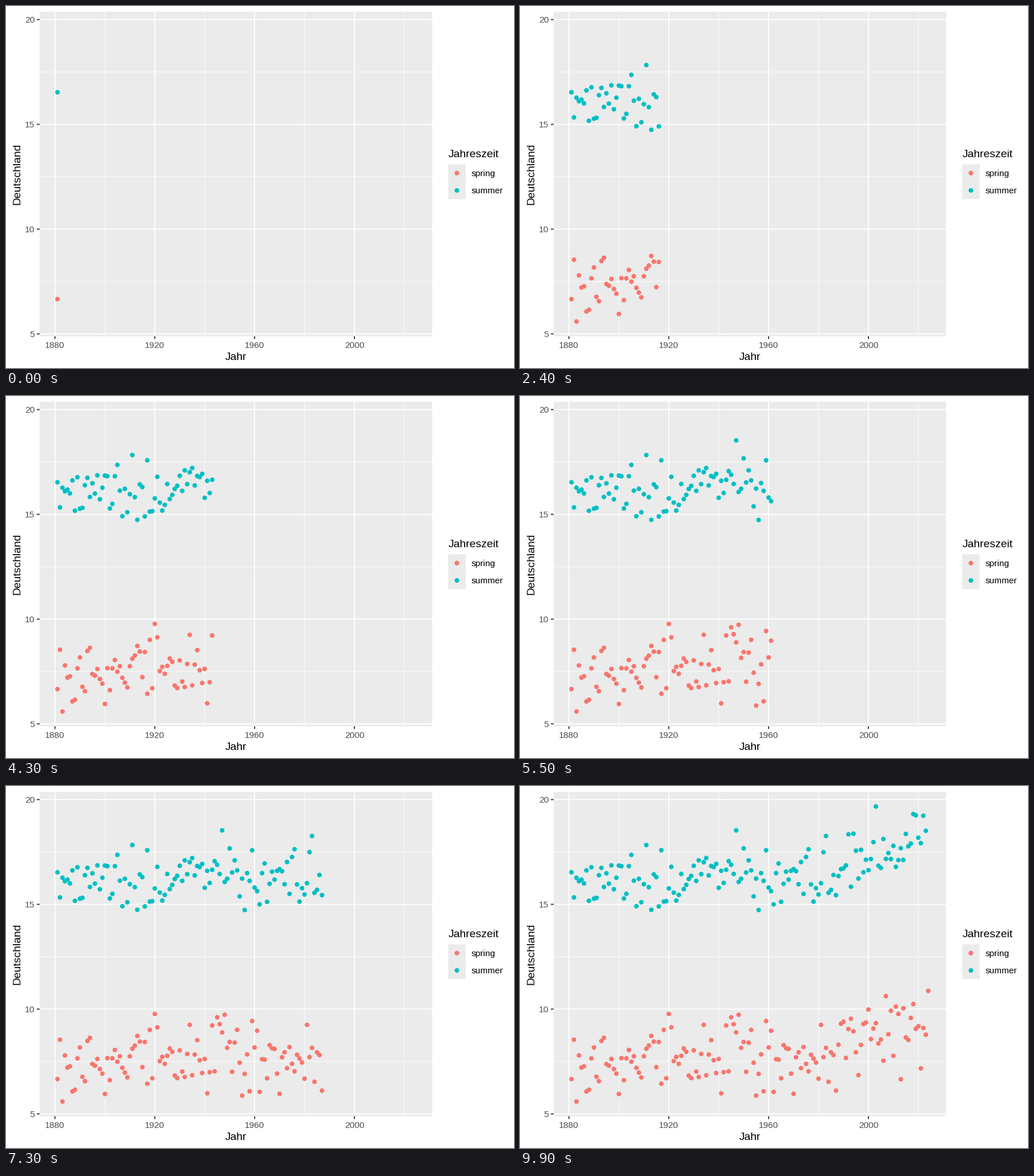
A matplotlib script that plays this animation: 885x632 px, repeating every 10000 ms.

```python
import matplotlib.pyplot as plt
import numpy as np
from matplotlib.animation import FuncAnimation
from matplotlib.colors import to_rgba
from matplotlib.patches import Rectangle

W, H, DPI = 885, 632, 64
PT = 72 / DPI  # points per pixel
FRAMES = 100
FIRST, LAST = 1881, 2024
LEFT, RIGHT, TOP, BOTTOM = 58.6, 742.4, 10.0, 576.6
SMALL, LARGE = 15.4, 19.3
CORAL, TEAL = "#F8766D", "#00BFC4"
PANEL, TICK, LABEL = "#EBEBEB", "#333333", "#4D4D4D"

# mean temperatures in °C, one value per year from 1881
SPRING = [
    6.66, 8.54, 5.59, 7.79, 7.21, 7.27, 6.07, 6.15, 7.65, 8.17,
    6.77, 6.56, 8.48, 8.63, 7.38, 7.30, 7.62, 7.14, 6.92, 5.95,
    7.66, 6.61, 7.65, 8.05, 7.49, 7.75, 7.20, 6.97, 6.74, 7.75,
    8.11, 8.26, 8.72, 8.45, 7.23, 8.43, 6.44, 9.01, 6.70, 9.77,
    9.13, 7.52, 7.72, 7.39, 7.77, 8.12, 7.96, 6.83, 6.71, 8.03,
    7.02, 6.76, 7.86, 9.25, 6.84, 7.83, 8.52, 7.56, 6.95, 7.62,
    5.98, 6.99, 9.22, 7.03, 9.61, 9.28, 8.89, 9.73, 8.15, 8.43,
    7.01, 8.40, 9.01, 7.44, 5.87, 6.91, 7.84, 6.08, 9.43, 8.17,
    8.97, 6.05, 7.61, 7.59, 6.70, 8.28, 8.13, 8.10, 6.92, 5.96,
    7.70, 7.94, 7.18, 8.19, 7.39, 7.03, 7.82, 7.64, 7.45, 6.68,
    9.25, 7.71, 8.15, 6.53, 7.94, 7.81, 6.11, 8.30, 9.30, 9.40,
    7.67, 9.05, 9.54, 8.94, 7.94, 6.85, 8.29, 9.29, 9.36, 9.98,
    8.57, 9.07, 9.33, 8.36, 8.55, 7.54, 10.62, 8.80, 9.92, 7.77,
    10.12, 9.77, 6.65, 10.04, 8.65, 8.53, 9.58, 10.24, 9.06, 9.18,
    7.17, 9.10, 8.78, 10.87,
]
SUMMER = [
    16.53, 15.33, 16.27, 16.10, 16.18, 16.00, 16.62, 15.17, 16.77, 15.27,
    15.31, 16.39, 16.74, 15.83, 16.48, 15.99, 16.86, 15.72, 16.27, 16.85,
    16.82, 15.28, 15.50, 16.82, 17.36, 16.13, 14.91, 16.22, 15.10, 15.96,
    17.83, 15.82, 14.74, 16.43, 16.30, 14.90, 17.58, 15.13, 15.15, 15.76,
    16.79, 15.56, 15.18, 15.45, 16.45, 15.73, 15.93, 16.21, 16.36, 16.84,
    16.12, 17.10, 16.44, 17.01, 17.21, 16.38, 16.83, 16.78, 16.93, 15.79,
    16.60, 16.02, 16.65, 17.06, 16.89, 16.45, 18.53, 16.07, 16.22, 17.67,
    16.52, 17.10, 16.62, 15.38, 16.23, 14.73, 16.49, 16.12, 17.58, 15.80,
    15.63, 15.00, 16.49, 16.95, 15.12, 15.98, 16.56, 16.18, 16.60, 16.68,
    16.58, 15.96, 17.02, 15.50, 17.26, 17.63, 15.95, 15.13, 15.77, 15.47,
    16.01, 17.49, 18.26, 15.55, 15.69, 16.40, 15.44, 16.35, 16.68, 16.72,
    16.86, 18.34, 15.84, 18.37, 17.56, 16.23, 17.60, 16.53, 17.13, 16.63,
    17.16, 17.97, 19.67, 16.84, 16.74, 18.12, 17.17, 17.45, 17.16, 17.79,
    16.79, 17.11, 17.68, 17.12, 18.36, 17.77, 17.90, 19.31, 19.25, 18.18,
    17.92, 19.23, 18.51,
]


def scale(lo, hi, start, end):
    """Map data to pixels, with 5 % of room at both ends."""
    pad = 0.05 * (hi - lo)
    return lambda v: start + (v - lo + pad) / (hi - lo + 2 * pad) * (end - start)


px = scale(FIRST, LAST, LEFT, RIGHT)
py = scale(min(SPRING), max(SUMMER), BOTTOM, TOP)

plt.rcParams["font.family"] = "Liberation Sans"
fig = plt.figure(figsize=(W / DPI, H / DPI), dpi=DPI, facecolor="white")
ax = fig.add_axes([0, 0, 1, 1])
ax.set(xlim=(0, W), ylim=(H, 0))
ax.axis("off")


def rect(x, y, w, h):
    ax.add_patch(Rectangle((x, y), w, h, fc=PANEL, lw=0, snap=False, zorder=0))


def line(xs, ys, color="white", width=1.87):
    ax.plot(xs, ys, color=color, lw=width * PT, solid_capstyle="butt",
            snap=False, zorder=1)


def text(x, y, s, size=SMALL, color="black", **kw):
    ax.text(x, y, s, fontsize=size * PT, color=color, va="baseline",
            rotation_mode="anchor", **kw)


def dots(xy, colors):
    x, y = np.transpose(xy)
    return ax.scatter(x, y, s=(8.1 * PT) ** 2, c=colors, linewidths=0, zorder=3)


rect(LEFT, TOP, RIGHT - LEFT, BOTTOM - TOP)
for ticks_x, ticks_y, width in [
    (range(1900, 2021, 40), (7.5, 12.5, 17.5), 0.93),
    (range(1880, 2001, 40), (5, 10, 15, 20), 1.87),
]:
    for v in ticks_y:
        line([LEFT, RIGHT], [py(v)] * 2, width=width)
    for v in ticks_x:
        line([px(v)] * 2, [TOP, BOTTOM], width=width)

for v in range(1880, 2001, 40):
    line([px(v)] * 2, [BOTTOM, BOTTOM + 4.8], TICK)
    text(px(v), 597, str(v), color=LABEL, ha="center")
for v in (5, 10, 15, 20):
    line([LEFT - 4.8, LEFT], [py(v)] * 2, TICK)
    text(49.9, py(v) + 5.5, str(v), color=LABEL, ha="right")

text((LEFT + RIGHT) / 2, 618.4, "Jahr", LARGE, ha="center")
text(24, (TOP + BOTTOM) / 2, "Deutschland", LARGE, ha="center", rotation=90)

# legend
rect(770.4, 276.5, 30.3, 60.6)
text(770.4, 264.3, "Jahreszeit", LARGE)
text(810.3, 297, "spring")
text(810.3, 327.4, "summer")
dots([(785.5, 291.7), (785.5, 322)], [CORAL, TEAL])

series = [(SPRING, CORAL), (SUMMER, TEAL)]
steps = np.concatenate([np.arange(len(vals)) for vals, _ in series])
temps = np.concatenate([vals for vals, _ in series])
rgba = np.array([to_rgba(c) for vals, c in series for _ in vals])
xy = np.column_stack([px(FIRST + steps), py(temps)])
start = np.round(steps * (FRAMES - 1) / (LAST - FIRST))
points = dots(xy, rgba)


def update(frame):
    shown = start <= frame
    points.set_offsets(xy[shown])
    points.set_facecolor(rgba[shown])
    return [points]


anim = FuncAnimation(fig, update, frames=FRAMES, interval=100,
                     repeat=True, repeat_delay=0)
plt.show()
```
